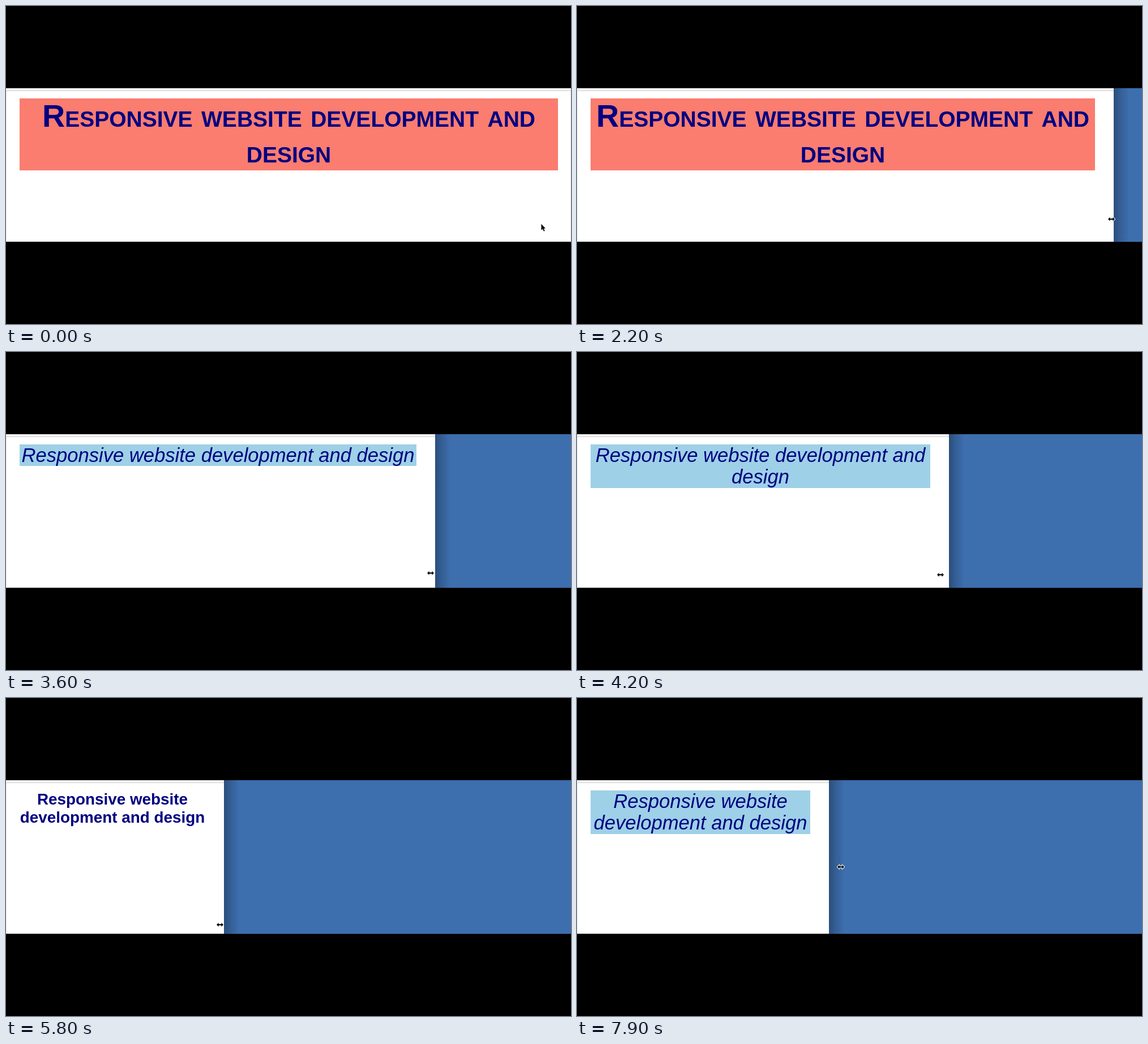
An HTML page for the animation above (8 s loop, 998x561 px).

```html
<!DOCTYPE html>
<html lang="en">
<head>
<meta charset="utf-8">
<title>Responsive heading</title>
<style>
  html, body {
    margin: 0;
    width: 100%;
    height: 100%;
    overflow: hidden;
    background: #000;
  }

  .screen {
    position: absolute;
    top: 145px;
    left: 0;
    width: 998px;
    height: 270.5px;
    overflow: hidden;
    background: #3d6eae;
  }

  .window {
    position: absolute;
    inset: 0 auto 0 0;
    width: 1008px;
    container-type: inline-size;
    background:
      linear-gradient(#d2d0d0, #d2d0d0) 0 4px / 100% 1px no-repeat,
      linear-gradient(#f6f3f3, #f6f3f3) 0 0 / 100% 4px no-repeat,
      linear-gradient(#e6e6e6, #e6e6e6) 0 0 / 1px 100% no-repeat,
      linear-gradient(#e6e6e6, #e6e6e6) 997px 0 / 1px 100% no-repeat,
      linear-gradient(#dcdcdc, #dcdcdc) 0 100% / 100% 1px no-repeat,
      #fff;
    animation: resize 8s infinite;
  }

  .window::after {
    content: "";
    position: absolute;
    inset: 0 auto 0 100%;
    width: 27px;
    background: linear-gradient(90deg, rgba(0, 0, 0, .29), rgba(0, 0, 0, .14) 45%, transparent);
  }

  h1 {
    position: absolute;
    top: 17.5px;
    left: 24px;
    right: 33px;
    margin: 0;
    text-align: center;
    color: #000080;
    background: #fa7d6f;
    font: bold small-caps 55.65px/63.75px "Liberation Sans", Arial, sans-serif;
  }

  @container (max-width: 840px) {
    h1 {
      background: #9ed0e7;
      font: italic 34.6px/38.75px "Liberation Sans", Arial, sans-serif;
    }
  }

  @container (max-width: 437px) {
    h1 {
      background: none;
      font: bold 27.85px/32px "Liberation Sans", Arial, sans-serif;
    }
  }

  .cursor {
    position: absolute;
    top: 0;
    left: 0;
    width: 1px;
    height: 1px;
    overflow: visible;
    stroke: #fff;
    stroke-linejoin: round;
    paint-order: stroke;
    animation: move 8s infinite;
  }

  .arrow { animation: arrow 8s step-end infinite; }
  .sizer { animation: sizer 8s step-end infinite; }

  /* One step per 100 ms (1.25%) */
  @keyframes resize {
    0%     { width: 1008px; animation-timing-function: steps(10); }
    12.5%  { width: 1008px; animation-timing-function: steps(8); }
    22.5%  { width: 1000px; animation-timing-function: steps(4); }
    27.5%  { width: 948px;  animation-timing-function: steps(5); }
    33.75% { width: 869px;  animation-timing-function: steps(3); }
    37.5%  { width: 858px;  animation-timing-function: steps(6); }
    45%    { width: 758px;  animation-timing-function: steps(6); }
    52.5%  { width: 657px;  animation-timing-function: steps(3); }
    56.25% { width: 614px;  animation-timing-function: steps(7); }
    65%    { width: 471.5px; animation-timing-function: steps(2); }
    67.5%  { width: 442px;  animation-timing-function: steps(4); }
    72.5%  { width: 385px;  animation-timing-function: steps(14); }
    90%    { width: 385px;  animation-timing-function: steps(7); }
    98.75%, 100% { width: 445px; }
  }

  @keyframes move {
    0%     { transform: translate(945px, 384px); animation-timing-function: steps(7); }
    8.75%  { transform: translate(985px, 374px); animation-timing-function: steps(2); }
    11.25% { transform: translate(991px, 374px); animation-timing-function: steps(9); }
    22.5%  { transform: translate(985px, 374px); animation-timing-function: steps(4); }
    27.5%  { transform: translate(944px, 376px); animation-timing-function: steps(5); }
    33.75% { transform: translate(870px, 384px); animation-timing-function: steps(3); }
    37.5%  { transform: translate(858px, 388px); animation-timing-function: steps(6); }
    45%    { transform: translate(750px, 390px); animation-timing-function: steps(6); }
    52.5%  { transform: translate(642px, 393px); animation-timing-function: steps(10); }
    65%    { transform: translate(461px, 401px); animation-timing-function: steps(3); }
    68.75% { transform: translate(410px, 401px); animation-timing-function: steps(3); }
    72.5%  { transform: translate(378px, 400px); animation-timing-function: steps(7); }
    81.25% { transform: translate(272px, 231px); animation-timing-function: steps(3); }
    85%    { transform: translate(275px, 236px); animation-timing-function: steps(3); }
    88.75% { transform: translate(388px, 297px); animation-timing-function: steps(2); }
    91.25% { transform: translate(392px, 298px); animation-timing-function: steps(6); }
    98.75%, 100% { transform: translate(466px, 298px); }
  }

  @keyframes arrow {
    0%, 73.75% { opacity: 1; }
    11.25%, 88.75%, 100% { opacity: 0; }
  }

  @keyframes sizer {
    0%, 73.75% { opacity: 0; }
    11.25%, 88.75%, 100% { opacity: 1; }
  }
</style>
</head>
<body>
  <div class="screen">
    <div class="window">
      <h1>Responsive website development and design</h1>
    </div>
  </div>
  <svg class="cursor">
    <path class="arrow" stroke-width="1.4" d="M.5 .5V11.5L3 9.2 5 13.6 6.7 12.8 4.8 8.6H8Z"/>
    <path class="sizer" stroke-width="2" d="M-6 0L-2.4-3.6V-1H2.4V-3.6L6 0 2.4 3.6V1H-2.4V3.6Z"/>
  </svg>
</body>
</html>
```
